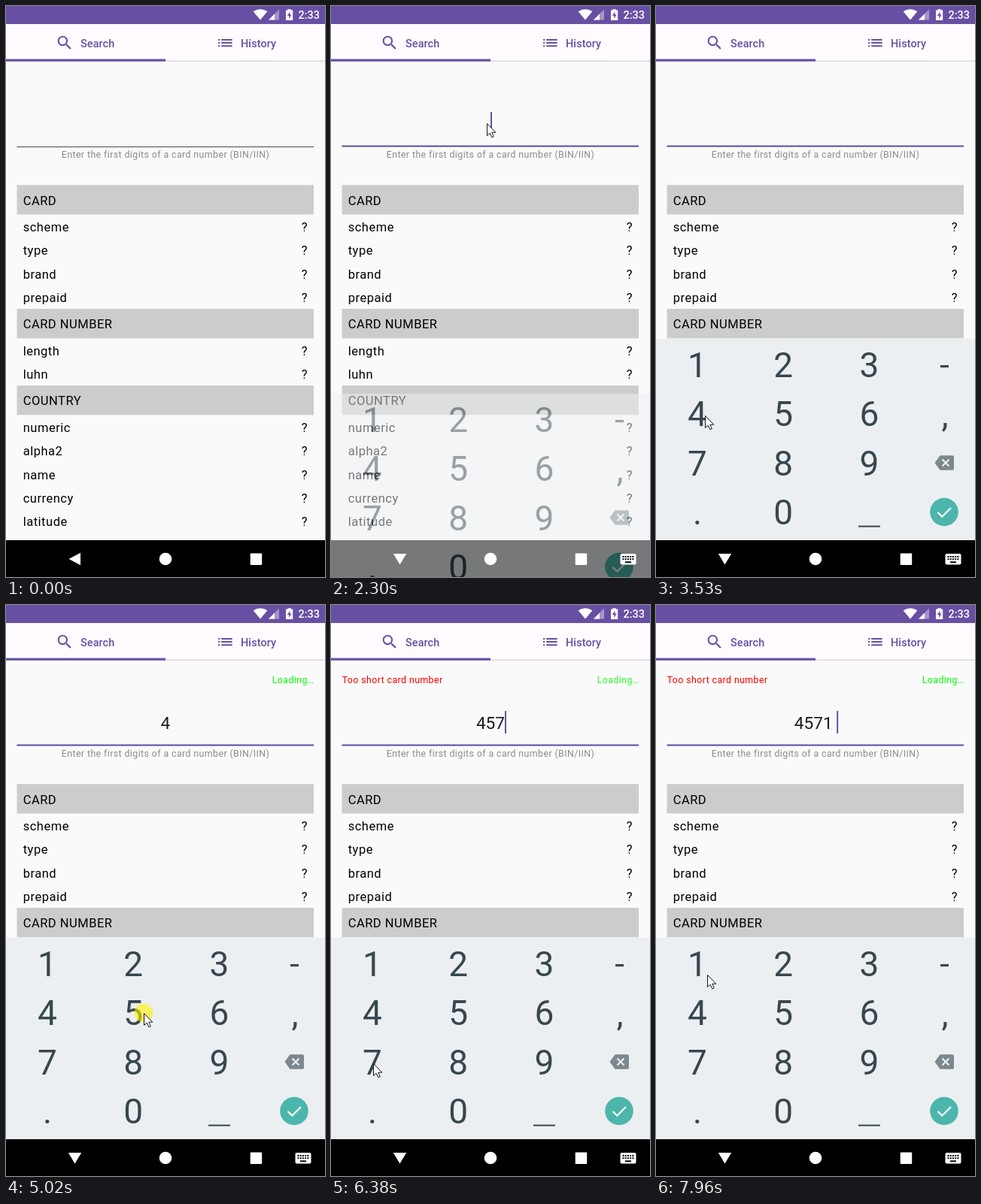
Animation, 424 px wide and 760 px high, one loop 8 s. Source, as an HTML page:

```html
<!DOCTYPE html>
<html lang="en">
<head>
<meta charset="utf-8">
<title>Card lookup</title>
<style>
  html, body { margin: 0; height: 100%; overflow: hidden; background: #fafafa; }
  svg { display: block; width: 100vw; height: 100vh; }
  text { font-family: Roboto, "Open Sans", sans-serif; white-space: pre; }

  .tab { font-size: 14.43px; font-weight: 500; letter-spacing: .1px; fill: #6750a4; }
  .row { font-size: 16.49px; letter-spacing: .515px; fill: #000; }
  .small { font-size: 12.37px; letter-spacing: .41px; }
  .field { font-size: 22.67px; fill: #1c1b1f; }
  .key { font-size: 46px; fill: #37474f; text-anchor: middle; }
  .end { text-anchor: end; }
  .mid { text-anchor: middle; }

  /* 1% of the loop is 80 ms */
  .a { animation: 8s step-end infinite; }
  .idle { animation-name: idle; }
  .focus { animation-name: focus; }
  .t1 { animation-name: t1; }
  .t2 { animation-name: t2; }
  .t3 { animation-name: t3; }
  .t4 { animation-name: t4; }
  .error { animation-name: error; }
  .loading { animation-name: loading; }
  .blink { animation-name: blink; }
  .place { animation-name: place; }
  .press { animation-name: press; }
  .board { animation: board 8s linear infinite; }
  .mouse { animation: mouse 8s linear infinite; }

  @keyframes idle { 0% { opacity: 1 } 24.5%, 100% { opacity: 0 } }
  @keyframes focus { 0% { opacity: 0 } 24.5%, 100% { opacity: 1 } }
  @keyframes t1 { 0% { opacity: 0 } 51.75% { opacity: 1 } 66.1%, 100% { opacity: 0 } }
  @keyframes t2 { 0% { opacity: 0 } 66.1% { opacity: 1 } 78.8%, 100% { opacity: 0 } }
  @keyframes t3 { 0% { opacity: 0 } 78.8% { opacity: 1 } 93.3%, 100% { opacity: 0 } }
  @keyframes t4 { 0% { opacity: 0 } 93.3%, 100% { opacity: 1 } }
  @keyframes error { 0% { opacity: 0 } 66.1%, 100% { opacity: 1 } }
  @keyframes loading {
    0% { opacity: 0 } 52.5% { opacity: 1 } 73% { opacity: 0 }
    78.8% { opacity: .85 } 84.1%, 100% { opacity: 1 }
  }
  @keyframes blink {
    0% { opacity: 0 } 25.3% { opacity: 1 } 31.6% { opacity: 0 }
    37.8% { opacity: 1 } 44.1% { opacity: 0 } 51.75% { opacity: 1 }
    58% { opacity: 0 } 64.2% { opacity: 1 } 72.3% { opacity: 0 }
    78.6% { opacity: 1 } 85.1% { opacity: 0 } 91.3%, 100% { opacity: 1 }
  }
  @keyframes place {
    0% { transform: translateX(212px) } 51.75% { transform: translateX(218.4px) }
    66.1% { transform: translateX(224.7px) } 78.8% { transform: translateX(231px) }
    93.3%, 100% { transform: translateX(240.2px) }
  }
  @keyframes press {
    0% { opacity: 0 } 20.3% { opacity: 1 } 22.1% { opacity: 0 }
    46.7% { opacity: 1 } 48.3% { opacity: 0 } 61.8% { opacity: 1 } 63.6% { opacity: 0 }
    76.3% { opacity: 1 } 78% { opacity: 0 } 91.6% { opacity: 1 } 94.2%, 100% { opacity: 0 }
  }
  @keyframes board {
    0%, 27.5% { transform: translateY(135px); opacity: 0 }
    28.75% { transform: translateY(73.5px); opacity: .5 }
    30.25%, 100% { transform: none; opacity: 1 }
  }
  @keyframes mouse {
    0%, 1.4% { transform: translate(390px, 766px) }
    1.5% { transform: translate(386px, 744px); animation-timing-function: ease-in-out }
    9.2% { transform: translate(207px, 138px) }
    11% { transform: translate(202px, 151px) }
    13.5%, 30.4% { transform: translate(207px, 156px); animation-timing-function: ease-in-out }
    39.1% { transform: translate(66px, 545px) }
    40.7%, 51% { transform: translate(65px, 545px) }
    55.2%, 56.9% { transform: translate(105px, 581px); animation-timing-function: ease-in-out }
    61.3%, 63.7% { transform: translate(183px, 543px); animation-timing-function: ease-in-out }
    67%, 67.8% { transform: translate(58px, 614px) }
    69.6%, 83.3% { transform: translate(56px, 610px); animation-timing-function: ease-in-out }
    90.6%, 94.2% { transform: translate(56px, 473px); animation-timing-function: ease-in-out }
    99.5%, 100% { transform: translate(68px, 492px) }
  }
</style>
</head>
<body>
<svg viewBox="0 0 424 760" preserveAspectRatio="none">
  <rect width="424" height="760" fill="#fafafa"/>

  <!-- status bar -->
  <rect width="424" height="24" fill="#6750a4"/>
  <g fill="#fff">
    <path d="M338 18.5L328.6 7.2Q338 1.2 347.4 7.2Z"/>
    <path d="M349 18.5H363V4.5Z" opacity=".4"/>
    <path d="M349 18.5H357V10.5Z"/>
    <path d="M374.5 4.2V5.6H372V19H381.2V5.6H378.7V4.2Z"/>
    <text x="388.5" y="17" font-size="14.43" font-weight="500">2:33</text>
  </g>
  <path d="M377.4 7.5L373.8 13H376.2V17L379.6 11.4H377.4Z" fill="#6750a4"/>

  <!-- tabs -->
  <rect y="24" width="424" height="49.5" fill="#fffbfe"/>
  <rect y="72.7" width="424" height="1" fill="#cac4d0"/>
  <rect y="70.6" width="212" height="3.1" fill="#6750a4"/>
  <g fill="#6750a4">
    <path transform="translate(65.6 36.7) scale(1.03)" d="M15.5 14h-.79l-.28-.27C15.41 12.59 16 11.11 16 9.5 16 5.91 13.09 3 9.5 3S3 5.91 3 9.5 5.91 16 9.5 16c1.61 0 3.09-.59 4.23-1.57l.27.28v.79l5 4.99L20.49 19l-4.99-5zm-6 0C7.01 14 5 11.99 5 9.5S7.01 5 9.5 5 14 7.01 14 9.5 11.99 14 9.5 14z"/>
    <path transform="translate(279 36.7) scale(1.03)" d="M3 13h2v-2H3v2zm0 4h2v-2H3v2zm0-8h2V7H3v2zm4 4h14v-2H7v2zm0 4h14v-2H7v2zM7 7v2h14V7H7z"/>
  </g>
  <text class="tab" x="99" y="55">Search</text>
  <text class="tab" x="312" y="55">History</text>

  <!-- number field -->
  <text class="small a error" x="14.7" y="104.3" fill="#f00">Too short card number</text>
  <text class="small a loading end" x="409.5" y="104.3" fill="#0f0">Loading…</text>
  <g class="field">
    <text class="a t1" x="205.6" y="165">4</text>
    <text class="a t2" x="199.3" y="165">45</text>
    <text class="a t3" x="192.9" y="165">457</text>
    <text class="a t4" x="183.8" y="165">4571</text>
  </g>
  <g class="a place"><rect class="a blink" y="141" width="2" height="30" fill="#6750a4"/></g>
  <rect class="a idle" x="14.5" y="187" width="394.5" height="1" fill="#49454f"/>
  <rect class="a focus" x="14.5" y="185.5" width="394.5" height="2.1" fill="#6750a4"/>
  <text class="small mid" x="212" y="201.5" fill="#8b8b8b">Enter the first digits of a card number (BIN/IIN)</text>

  <g id="list"></g>

  <!-- navigation bar and keyboard -->
  <rect y="711" width="424" height="49" fill="#000"/>
  <g class="board">
    <rect y="443" width="424" height="268" fill="#eceff1"/>
    <g id="keys"></g>
    <g fill="#37474f">
      <rect x="378" y="478" width="11" height="3.2"/>
      <rect x="269" y="691.6" width="29" height="2"/>
    </g>
    <path d="M370.5 608L377.5 598.3H394Q396 598.3 396 600.3V615.700Q396 617.700 394 617.700H377.5Z" fill="#7b888e"/>
    <path d="M380.5 603.500L389.500 612.500M389.500 603.500L380.500 612.500" stroke="#eceff1" stroke-width="2.2"/>
    <circle cx="383" cy="673.5" r="18.8" fill="#4db6ac"/>
    <path d="M374.500 674L380.300 679.800L392 668" fill="none" stroke="#fff" stroke-width="2.200"/>
  </g>
  <g fill="#fff">
    <path class="a idle" d="M83.500 736L99 727.700V744.300Z"/>
    <path class="a focus" d="M82.800 729H100.200L91.500 743.500Z"/>
    <circle cx="212" cy="736" r="8.300"/>
    <rect x="324.700" y="728.400" width="15.500" height="15.500" rx="1"/>
    <g class="a focus">
      <rect x="384.500" y="729" width="21" height="14.500" rx="2"/>
      <path d="M387.500 733H403M387.500 736.300H403" stroke="#000" stroke-width="2" stroke-dasharray="2 1.200"/>
      <path d="M391 740.300H399" stroke="#000" stroke-width="2"/>
    </g>
  </g>

  <!-- pointer -->
  <g class="mouse">
    <circle class="a press" r="12.500" fill="#fff500" fill-opacity=".6"/>
    <path d="M.5 .5V16.500L4.200 13.200L6.800 18.800L9.300 17.700L6.800 12.200H11.800Z" fill="#fff" stroke="#111" stroke-linejoin="round"/>
  </g>
</svg>
<script>
  const groups = [
    ["CARD", "scheme", "type", "brand", "prepaid"],
    ["CARD NUMBER", "length", "luhn"],
    ["COUNTRY", "numeric", "alpha2", "name", "currency", "latitude"]
  ];
  const headH = 39.2, rowH = 31.4;
  let y = 238.3, list = "";
  for (const [title, ...rows] of groups) {
    list += `<rect x="14.5" y="${y}" width="394.5" height="${headH}" fill="#ccc"/>
      <text class="row" x="22.7" y="${y + 26.3}">${title}</text>`;
    y += headH;
    for (const name of rows) {
      list += `<text class="row" x="22.7" y="${y + 22.4}">${name}</text>
        <text class="row end" x="401" y="${y + 22.4}">?</text>`;
      y += rowH;
    }
  }
  document.getElementById("list").innerHTML = list;

  const key = (c, x, y) => `<text class="key" x="${x}" y="${y}">${c}</text>`;
  let keys = key(",", 384, 560) + key(".", 55, 690) + key(0, 169.3, 690.3);
  for (let i = 0; i < 9; i++) {
    keys += key(i + 1, 55 + i % 3 * 114.2, 494 + Math.floor(i / 3) * 65.4);
  }
  document.getElementById("keys").innerHTML = keys;
</script>
</body>
</html>
```
